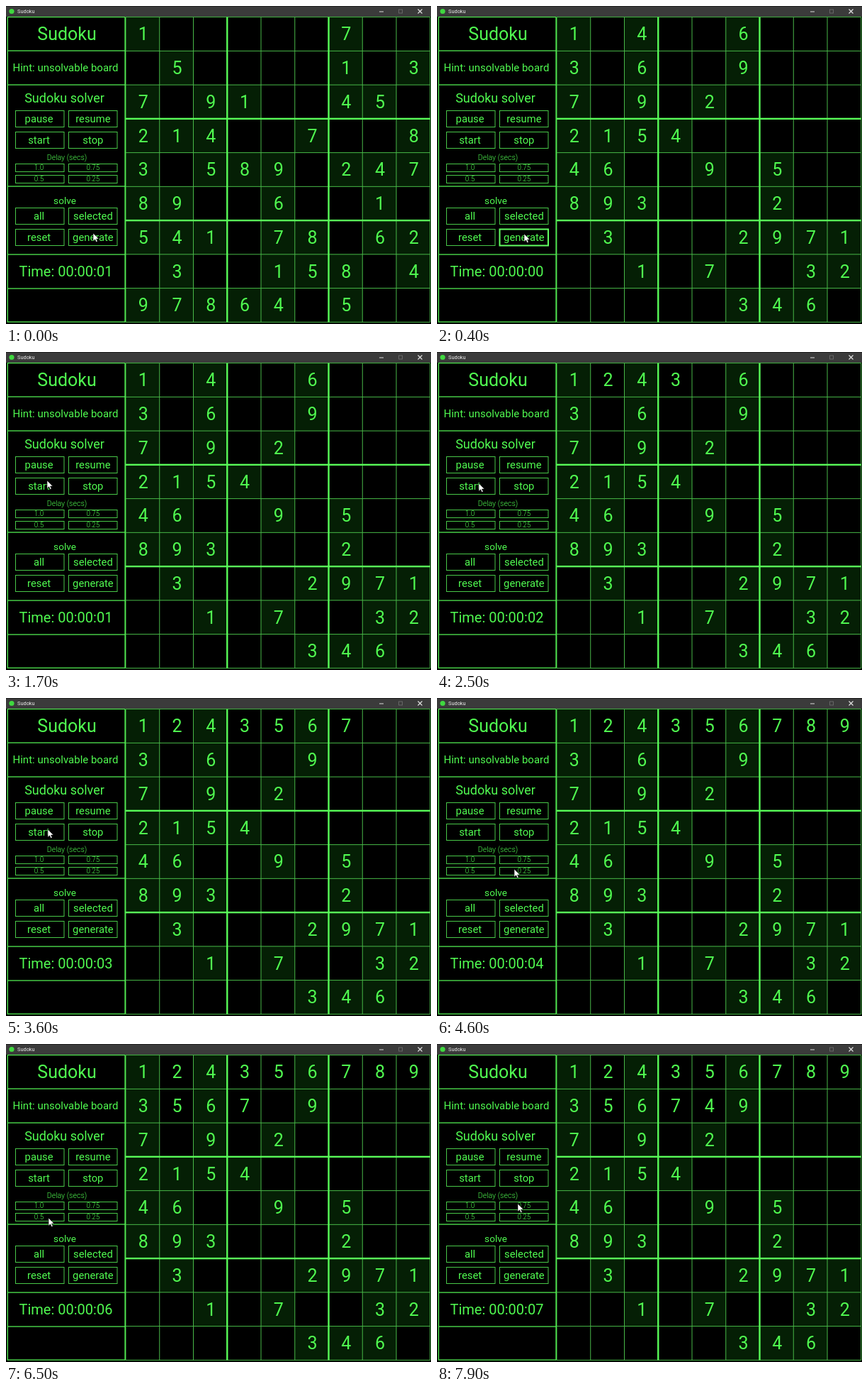
An HTML page that plays this animation: 600x448 px, repeating every 8000 ms.

```html
<!DOCTYPE html>
<html lang="en">
<head>
<meta charset="utf-8">
<title>Sudoku</title>
<style>
html, body { margin: 0; width: 100%; height: 100%; overflow: hidden; background: #000; }
svg { display: block; width: 600px; height: 448px; font-family: Roboto, Inter, sans-serif; }
text { fill: #50fa50; }
.mid { text-anchor: middle; }
.thin { font-weight: 300; }
.box { fill: none; stroke: #48c848; stroke-width: 1; }
.box.on { stroke: #62ff62; stroke-width: 2; }
</style>
</head>
<body>
<svg id="stage" viewBox="0 0 600 448"></svg>
<script>
const LOOP = 8000;
const NEW_GAME = 300;
const LEFT = 169, TOP = 15.6, CELL = 47.75;

const stage = document.getElementById('stage');

function add(tag, attrs, content) {
  const el = document.createElementNS('http://www.w3.org/2000/svg', tag);
  for (const key in attrs) el.setAttribute(key, attrs[key]);
  if (content) el.textContent = content;
  stage.append(el);
  return el;
}

const rect = (x, y, width, height, fill) => add('rect', { x, y, width, height, fill });
const label = (content, x, y, size, cls = 'mid') =>
  add('text', { x, y, 'font-size': size, class: cls }, content);

const boards = [
  '1.....7.. .5....1.3 7.91..45. 214..7..8 3.589.247 89..6..1. 541.78.62 .3..158.4 97864.5..',
  '1.4..6... 3.6..9... 7.9.2.... 2154..... 46..9.5.. 893...2.. .3...2971 ..1.7..32 .....346.'
].map(b => b.replace(/ /g, ''));

// Solver steps: time, cell index, digit ('' clears the cell)
const steps = [
  [1950, 1, 2], [2450, 3, 3], [2950, 4, 5], [3450, 6, 7], [3950, 7, 8], [4450, 8, 9],
  [5000, 10, 5], [5250, 12, 1], [5500, 13, 4], [5750, 13, 8], [6000, 13, ''],
  [6250, 12, 7], [6750, 13, 1], [7250, 13, 4]
];

// Pointer tip: time, x, y
const path = [
  [0, 123, 320], [400, 123, 321], [700, 123, 321], [1500, 58, 181], [1900, 58, 181],
  [2500, 59, 185], [3900, 59, 185], [4600, 109, 241], [4800, 112, 242], [5400, 112, 242],
  [6000, 60, 245], [6650, 60, 245], [7100, 114, 225], [8000, 114, 225]
];

// Button presses: name, start time
const presses = [['generate', 300], ['start', 1850], ['0.25', 4750], ['0.5', 6100], ['0.75', 7150]];
const PRESS_LENGTH = 200;

// Cells
const cells = Array.from({ length: 81 }, (_, i) => {
  const x = LEFT + (i % 9) * CELL;
  const y = TOP + Math.floor(i / 9) * CELL;
  return {
    back: rect(x, y, CELL, CELL, '#051f05'),
    digit: label('', x + CELL / 2 + 0.8, y + CELL / 2 + 9, 25)
  };
});

// Grid lines, thin ones first
const END = CELL * 9;
for (const thick of [false, true]) {
  for (let i = 0; i < 10; i++) {
    if ((i === 3 || i === 6) !== thick) continue;
    const w = thick ? 2.4 : 1;
    const fill = thick ? '#58fa58' : '#48b848';
    rect(LEFT + i * CELL - w / 2, TOP, w, END, fill);
    rect(LEFT, TOP + i * CELL - w / 2, END, w, fill);
  }
}

// Side panel
const edge = '#50e850';
rect(1.6, 15.5, 1.4, 430, edge);
rect(167.4, 15.5, 1.6, 430, edge);
for (const y of [15.5, 63, 111, 254, 350, 398, 445]) rect(2, y - 0.6, 166, 1.3, edge);

label('Sudoku', 86, 48, 25);
label('Hint: unsolvable board', 84, 92.2, 15);
label('Sudoku solver', 82.5, 136, 18);
label('Delay (secs)', 86, 217, 10.6, 'mid thin');
label('solve', 83, 279.3, 13.6);
const clock = label('', 18.5, 380.8, 20, '');

const buttons = {};
function button(name, col, y, height, size, cls) {
  const x = col ? 88.5 : 13.5;
  buttons[name] = add('rect', { x, y, width: 68.5, height, class: 'box' });
  label(name, x + 34.4 - (col ? 0 : 1.3), y + height / 2 + size * 0.32, size, cls);
}
[['pause', 'resume', 147.5], ['start', 'stop', 177.5], ['all', 'selected', 284.5], ['reset', 'generate', 314.5]]
  .forEach(([a, b, y]) => {
    button(a, 0, y, 23, 14.8, 'mid');
    button(b, 1, y, 23, 14.8, 'mid');
  });
[['1.0', '0.75', 222.5], ['0.5', '0.25', 238.5]].forEach(([a, b, y]) => {
  button(a, 0, y, 11, 10, 'mid thin');
  button(b, 1, y, 11, 10, 'mid thin');
});

// Title bar
rect(0, 0, 600, 15, '#3b3b3b');
rect(0, 0, 600, 1, '#222');
add('circle', { cx: 8, cy: 7.5, r: 3.6, fill: '#40d840' });
add('text', { x: 16, y: 10.4, 'font-size': 7.4, style: 'fill:#eee' }, 'Sudoku');
rect(527, 7.5, 6, 1, '#ddd');
add('rect', { x: 554.5, y: 5, width: 5, height: 5, fill: 'none', stroke: '#666' });
add('path', { d: 'M581.5 4.5l6 6m0-6l-6 6', stroke: '#e4e4e4', 'stroke-width': 1.1 });

const pointer = add('path', {
  d: 'M0 0V11.2L2.6 8.8L4.3 12.6L6.2 11.8L4.5 8.1H8Z',
  fill: '#fff', stroke: '#000', 'stroke-width': 0.6
});

function pointerAt(t) {
  const i = path.findIndex(p => p[0] > t);
  const [t0, x0, y0] = path[i - 1];
  const [t1, x1, y1] = path[i];
  const u = (t - t0) / (t1 - t0);
  const k = u * u * (3 - 2 * u);
  return [x0 + (x1 - x0) * k, y0 + (y1 - y0) * k];
}

function setText(el, value) {
  if (el.textContent !== value) el.textContent = value;
}

function draw(t) {
  const fresh = t >= NEW_GAME;
  const given = boards[fresh ? 1 : 0];
  const shown = [...given].map(c => c === '.' ? '' : c);
  for (const [at, cell, digit] of steps) if (t >= at) shown[cell] = String(digit);

  cells.forEach(({ back, digit }, i) => {
    back.setAttribute('visibility', given[i] === '.' ? 'hidden' : 'visible');
    setText(digit, shown[i]);
  });

  const secs = fresh ? Math.floor((t - NEW_GAME) / 1000) : 1;
  setText(clock, 'Time: 00:00:' + String(secs).padStart(2, '0'));

  for (const [name, at] of presses) {
    buttons[name].classList.toggle('on', t >= at && t < at + PRESS_LENGTH);
  }
  pointer.setAttribute('transform', `translate(${pointerAt(t)})`);
}

const began = performance.now();
function tick() {
  draw((performance.now() - began) % LOOP);
  requestAnimationFrame(tick);
}
tick();
</script>
</body>
</html>
```
